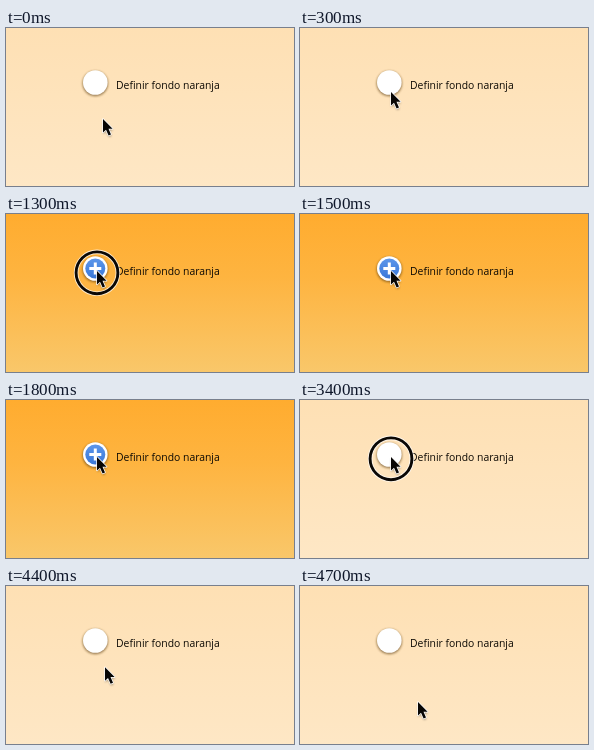
These frames come from a looping animation (288 px wide and 158 px high, 4.8 s). An HTML page:

```html
<!DOCTYPE html>
<html lang="es">
<head>
<meta charset="utf-8">
<title>Definir fondo naranja</title>
<style>
  html, body { margin: 0; width: 100%; height: 100%; overflow: hidden; background: #fde3bc; }
  svg { display: block; width: 100vw; height: 100vh; }
  text { font: 10.4px "Open Sans", "Noto Sans", sans-serif; fill: #0c0903; }
</style>
</head>
<body>
<svg viewBox="0 0 288 158">
  <defs>
    <linearGradient id="cream" x2="0" y2="1">
      <stop stop-color="#fee0b4"/>
      <stop offset="1" stop-color="#fee7c5"/>
    </linearGradient>
    <linearGradient id="orange" x2="0" y2="1">
      <stop stop-color="#ffac2f"/>
      <stop offset=".4" stop-color="#feb440"/>
      <stop offset="1" stop-color="#f9c76a"/>
    </linearGradient>
    <linearGradient id="blue" x2="0" y2="1">
      <stop stop-color="#5c96ea"/>
      <stop offset="1" stop-color="#3a78d8"/>
    </linearGradient>
    <filter id="soft" x="-50%" y="-50%" width="200%" height="200%">
      <feGaussianBlur stdDeviation="1.1"/>
    </filter>
    <path id="arrow" d="M0 0V13.5L3 10.7L5.6 16.5L8 15.4L5.5 9.8H9.6Z"/>
  </defs>

  <rect width="288" height="158" fill="url(#cream)"/>
  <rect id="on" width="288" height="158" fill="url(#orange)"/>

  <text x="110" y="61">Definir fondo naranja</text>

  <g transform="translate(89.3 54.5)">
    <circle cy="1" r="12.8" fill="#5a3a10" opacity=".6" filter="url(#soft)"/>
    <circle r="12.3" fill="#fff"/>
    <g id="plus">
      <circle r="10" fill="url(#blue)"/>
      <path d="M-6 0H6M0-6V6" stroke="#fff" stroke-width="3"/>
    </g>
  </g>

  <g id="ring" transform="translate(91 58.8)" fill="none">
    <circle r="20.9" stroke="#fff" stroke-opacity=".75" stroke-width="4.6"/>
    <circle r="20.9" stroke="#0b0805" stroke-width="2.9"/>
  </g>

  <g id="cursor">
    <use href="#arrow" transform="translate(.4 1.6)" opacity=".4" filter="url(#soft)"/>
    <use href="#arrow" fill="#080604" stroke="#fff" stroke-width="1.5" stroke-linejoin="round" paint-order="stroke"/>
  </g>
</svg>
<script>
  const LOOP = 4800, STEP = 100;
  const [turnOn, turnOff] = [1300, 3400];

  // Turning points of the pointer tip
  const turns = [
    { t: 0, x: 97, y: 91 },
    { t: 300, x: 91, y: 64 },
    { t: 600, x: 129, y: 52 },
    { t: 700, x: 91, y: 57 },
    { t: 3600, x: 91, y: 57 },
    { t: 3800, x: 146, y: 87 },
    { t: 4000, x: 91, y: 76 },
    { t: 4200, x: 89, y: 63 },
    { t: 4700, x: 118, y: 116 }
  ];

  const el = id => document.getElementById(id);
  const show = (id, visible) => el(id).setAttribute("visibility", visible ? "visible" : "hidden");
  const ease = p => (1 - Math.cos(Math.PI * p)) / 2;

  function pointer(t) {
    const a = turns.findLast(p => p.t <= t);
    const b = turns.find(p => p.t > t) || a;
    const p = a === b ? 0 : ease((t - a.t) / (b.t - a.t));
    return [a.x + (b.x - a.x) * p, a.y + (b.y - a.y) * p];
  }

  function draw(time) {
    const t = Math.floor(time / STEP) * STEP;
    const active = t >= turnOn && t < turnOff;
    el("cursor").setAttribute("transform", `translate(${pointer(t)})`);
    show("on", active);
    show("plus", active);
    show("ring", t === turnOn || t === turnOff);
  }

  const start = performance.now();
  function tick() {
    draw((performance.now() - start) % LOOP);
    requestAnimationFrame(tick);
  }
  tick();
</script>
</body>
</html>
```
